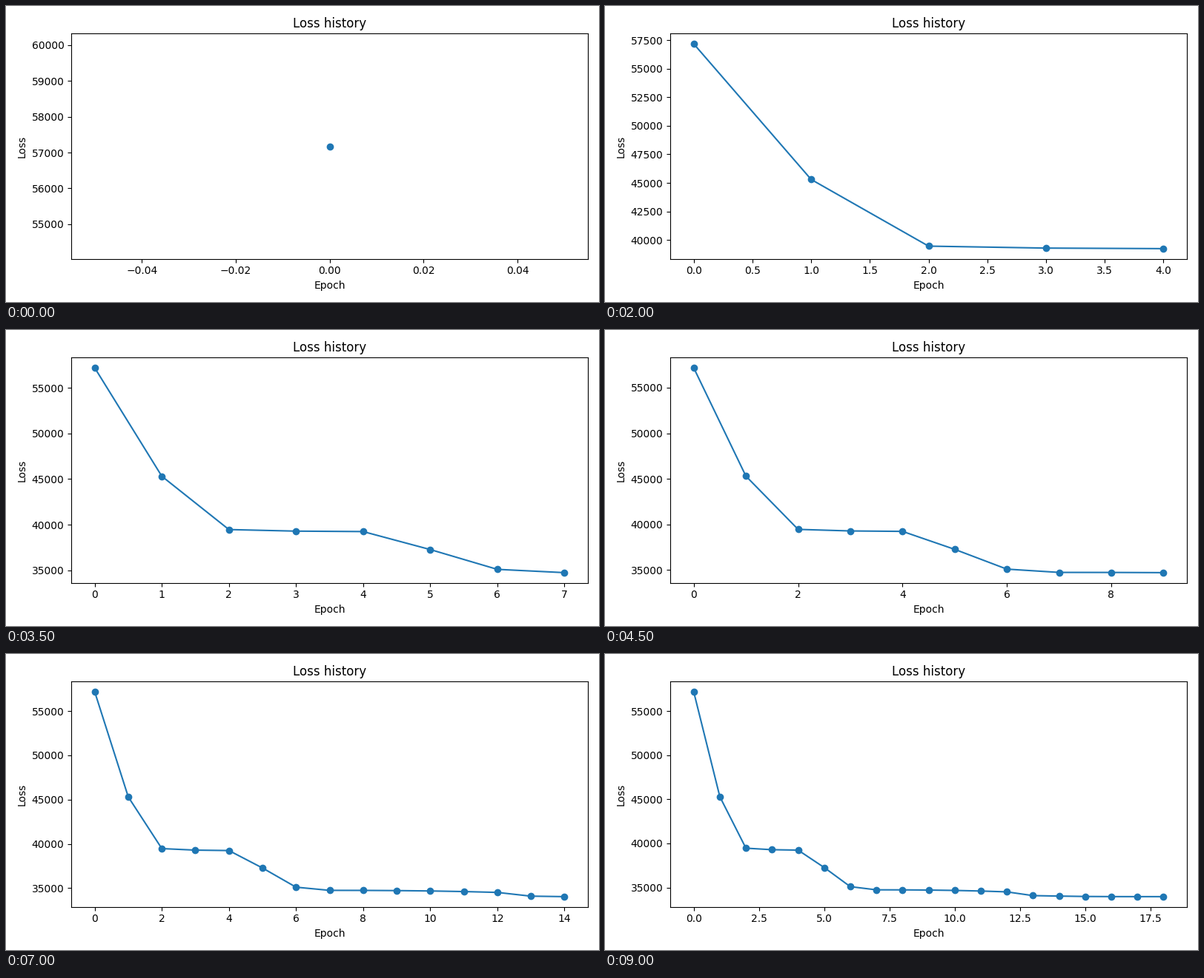
These frames come from a looping animation (800x400 px, 9.5 s). A matplotlib script:

```python
import math

import matplotlib.pyplot as plt
from matplotlib.animation import FuncAnimation

EPOCHS = 19
DESCENT = [57176, 45300, 39460, 39288, 39240, 37270, 35100]


def loss(epoch):
    """Steep descent, then a sagging plateau, then a decay to the floor."""
    if epoch < 7:
        return DESCENT[epoch]
    if epoch < 13:
        return 34740 - 232 * ((epoch - 7) / 5) ** 2.4
    return 33968 + 117 * math.exp(-0.63 * (epoch - 13) ** 1.5)


plt.rcParams["font.family"] = "DejaVu Sans"
fig, ax = plt.subplots(figsize=(8, 4), dpi=100)


def update(epoch):
    shown = range(epoch + 1)
    ax.clear()
    ax.plot(shown, [loss(e) for e in shown], marker="o", color="C0")
    ax.set_title("Loss history")
    ax.set_xlabel("Epoch")
    ax.set_ylabel("Loss")
    # Start from the same margins so each layout is independent of the last.
    fig.subplots_adjust(left=0.125, right=0.9, bottom=0.11, top=0.88)
    fig.tight_layout()
    return ax.lines


anim = FuncAnimation(
    fig, update, frames=EPOCHS, init_func=lambda: [],
    interval=500, repeat=True, repeat_delay=0, blit=False,
)

plt.show()
```
